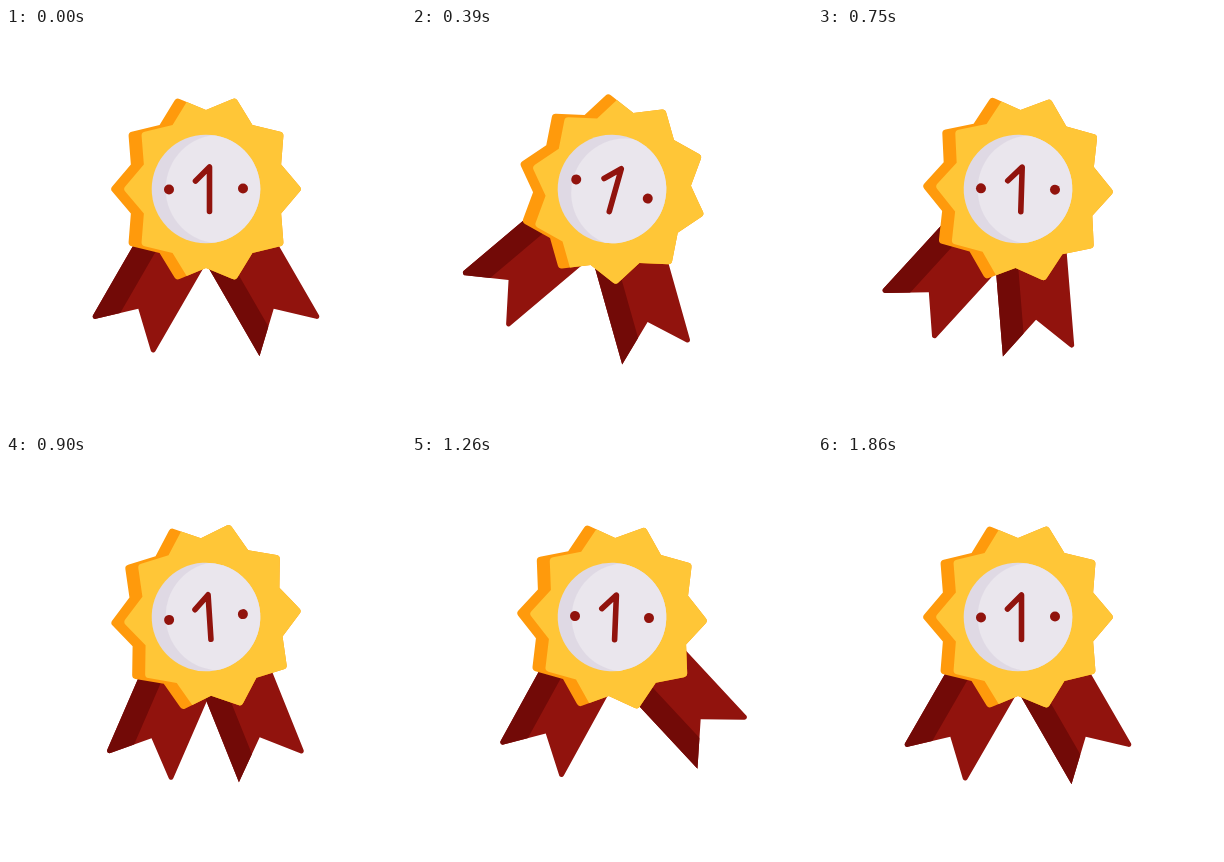
Write an HTML page with a canvas that moves like this. It is 400 by 400 pixels and loops after 4.43 s.

```html
<!DOCTYPE html>
<html lang="en">
<head>
<meta charset="utf-8">
<title>Award rosette</title>
<style>
  html, body { margin: 0; width: 100%; height: 100%; overflow: hidden; background: #fff; }
  canvas { display: block; width: 400px; height: 400px; }
</style>
</head>
<body>
<canvas id="stage" width="400" height="400"></canvas>
<script>
const ctx = document.getElementById('stage').getContext('2d');
const LOOP = 4430, STEP = 30, MOTION_END = 1860;
const RED = '#91130d', DARK_RED = '#720a07', YELLOW = '#ffc637', ORANGE = '#ff9a0c';
const SILVER = '#eae6ed', SILVER_SHADE = '#dfd9e4';
const LEFT = -1, RIGHT = 1;

// Swings start at rest and ease through their turning points: [time in ms, value].
const badgeTurn = swing([360, 15.8], [990, -4.7], [1330, 3.1], [1600, 0]);
const leftTurn = swing([70, -3], [560, 28.2], [995, -11], [1505, 7.5], [1650, 0]);
const rightTurn = swing([80, -3.8], [660, 28.8], [1165, -16], [1560, 6.5], [1860, 0]);
const ribbonLift = swing([600, 0], [930, 5], [1860, 0]);

function swing(...turningPoints) {
  return t => {
    let from = [0, 0];
    for (const to of turningPoints) {
      if (t < to[0]) {
        const progress = (t - from[0]) / (to[0] - from[0]);
        return from[1] + (to[1] - from[1]) * (1 - Math.cos(Math.PI * progress)) / 2;
      }
      from = to;
    }
    return from[1];
  };
}

const rad = deg => deg * Math.PI / 180;

// Closed path; each point is [x, y, corner radius].
function shape(points) {
  const path = new Path2D();
  const last = points[points.length - 1];
  path.moveTo((last[0] + points[0][0]) / 2, (last[1] + points[0][1]) / 2);
  points.forEach(([x, y, r = 0], i) => {
    const next = points[(i + 1) % points.length];
    path.arcTo(x, y, next[0], next[1], r);
  });
  path.closePath();
  return path;
}

function disc(x, y, r) {
  const path = new Path2D();
  path.arc(x, y, r, 0, 2 * Math.PI);
  return path;
}

function fill(path, color) {
  ctx.fillStyle = color;
  ctx.fill(path);
}

function isolated(draw) {
  ctx.save();
  draw();
  ctx.restore();
}

function fillWithin(clip, path, color) {
  isolated(() => {
    ctx.clip(clip);
    fill(path, color);
  });
}

// Even indices are tips, odd indices are valleys.
function starPoint(i) {
  const isTip = i % 2 === 0, radius = isTip ? 96 : 79, angle = rad(i * 18);
  return [radius * Math.cos(angle), radius * Math.sin(angle), isTip ? 4 : 0];
}

const star = shape(Array.from({ length: 20 }, (_, i) => starPoint(i)));
const shiftedLeftSide = Array.from({ length: 9 }, (_, i) => {
  const [x, y, r] = starPoint(i + 6);
  return [x + 13, y, r];
});
const starFace = shape([...shiftedLeftSide, [110, -110], [110, 110]]);
const medal = disc(0, 0, 54.3);
const medalFace = disc(14, 0, 54.3);

const ribbonStripe = shape([[-45, -125], [-13.5, -125], [-13.5, 10], [-45, 10]]);
const ribbonShape = side => shape([
  [-36, -118], [36, -118], [36, 3, 2.5], [0, -31], [-36, 3, side === LEFT ? 2.5 : 0]
]);
const ribbonShapes = { [LEFT]: ribbonShape(LEFT), [RIGHT]: ribbonShape(RIGHT) };

// Each ribbon hangs from a pivot that turns with the badge.
function ribbon(side, badgeAngle, angle) {
  const pivot = [15 * side, 17], foot = [83.2 * side, 146.6];
  isolated(() => {
    ctx.rotate(rad(badgeAngle));
    ctx.translate(...pivot);
    ctx.rotate(rad(angle - badgeAngle));
    ctx.translate(foot[0] - pivot[0], foot[1] - pivot[1]);
    ctx.rotate(rad(-30 * side));
    fill(ribbonShapes[side], RED);
    fillWithin(ribbonShapes[side], ribbonStripe, DARK_RED);
  });
}

function numeral() {
  ctx.strokeStyle = RED;
  ctx.lineWidth = 5.6;
  ctx.lineCap = ctx.lineJoin = 'round';
  ctx.beginPath();
  ctx.moveTo(-10.5, -8);
  ctx.lineTo(3.5, -22);
  ctx.lineTo(3.5, 22.5);
  ctx.stroke();
}

function badge(angle) {
  isolated(() => {
    ctx.rotate(rad(angle));
    fill(star, ORANGE);
    fillWithin(star, starFace, YELLOW);
    fill(medal, SILVER_SHADE);
    fillWithin(medal, medalFace, SILVER);
    for (const side of [LEFT, RIGHT]) fill(disc(37 * side, -0.5 * side, 5), RED);
    numeral();
  });
}

function render(elapsed) {
  const t = Math.min(Math.floor(elapsed % LOOP / STEP) * STEP, MOTION_END);
  const badgeAngle = badgeTurn(t);
  ctx.clearRect(0, 0, 400, 400);
  isolated(() => {
    ctx.translate(200, 161);
    isolated(() => {
      ctx.translate(0, -ribbonLift(t));
      ribbon(LEFT, badgeAngle, leftTurn(t));
      ribbon(RIGHT, badgeAngle, rightTurn(t));
    });
    badge(badgeAngle);
  });
}

const startTime = performance.now();
function tick() {
  render(performance.now() - startTime);
  requestAnimationFrame(tick);
}
tick();
</script>
</body>
</html>
```
